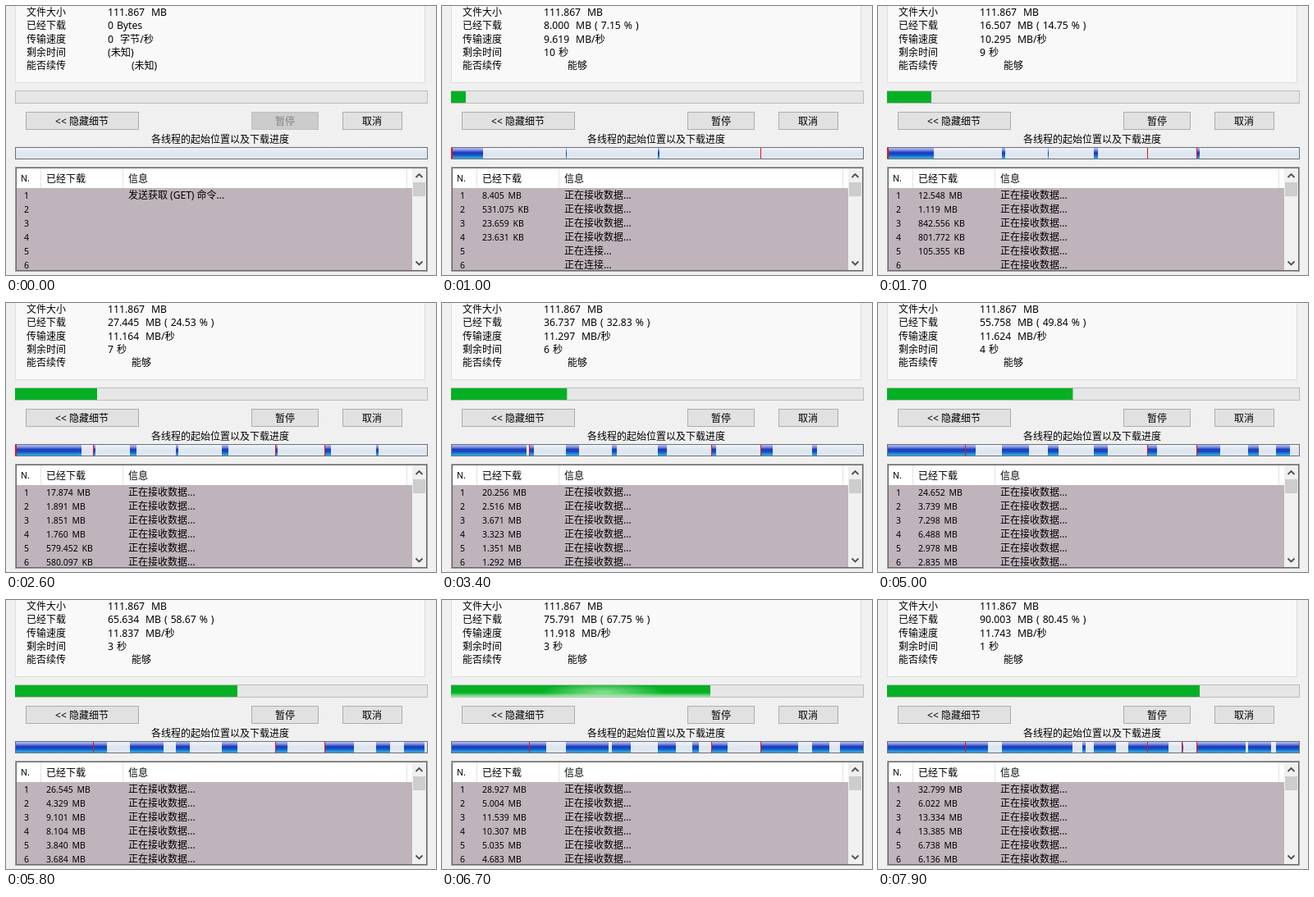
Animation, 524 px wide and 328 px high, one loop 8000 ms. Source, as an HTML page:

```html
<!DOCTYPE html>
<html lang="zh">
<head>
<meta charset="utf-8">
<style>
html, body { margin: 0; width: 100%; height: 100%; overflow: hidden; background: #f0f0f0; }
svg { display: block; }
text { font: 12px "Noto Sans", "Noto Sans CJK SC", "Noto Sans CJK", sans-serif; white-space: pre; }
.value { font-size: 12.2px; word-spacing: .8px; }
.cell { font-size: 10.5px; word-spacing: 2px; }
.mid { text-anchor: middle; }
</style>
</head>
<body>
<svg id="stage" width="524" height="328">
  <defs>
    <linearGradient id="track" x2="0" y2="1">
      <stop stop-color="#f1f4fa"/><stop offset=".5" stop-color="#dde5ef"/><stop offset="1" stop-color="#e0e8f2"/>
    </linearGradient>
    <linearGradient id="blue" x2="0" y2="1">
      <stop stop-color="#b4bdf0"/><stop offset=".22" stop-color="#7d8ee0"/><stop offset=".4" stop-color="#2440bd"/>
      <stop offset=".6" stop-color="#1446c0"/><stop offset="1" stop-color="#2cb4ea"/>
    </linearGradient>
    <radialGradient id="shine">
      <stop stop-color="#d8ffd8" stop-opacity=".6"/><stop offset="1" stop-color="#d8ffd8" stop-opacity="0"/>
    </radialGradient>
    <linearGradient id="rim" x2="0" y2="1">
      <stop stop-color="#d8ffd8" stop-opacity="0"/><stop offset="1" stop-color="#d8ffd8" stop-opacity=".75"/>
    </linearGradient>
  </defs>
</svg>
<script>
const TOTAL = 111.867, KB = 1 / 1024, PX_PER_MB = 502 / TOTAL;
const TIMES = [1000, 2600, 4400, 5800, 6700, 7900];
const stage = document.getElementById('stage');

function add(tag, attrs, content = '', parent = stage) {
  const el = document.createElementNS('http://www.w3.org/2000/svg', tag);
  for (const k in attrs) el.setAttribute(k, attrs[k]);
  el.textContent = content;
  return parent.appendChild(el);
}
const rect = (x, y, width, height, fill, parent) => add('rect', { x, y, width, height, fill }, '', parent);
const box = (x, y, w, h, fill, stroke) =>
  add('rect', { x: x + .5, y: y + .5, width: w - 1, height: h - 1, fill, stroke });
const label = (x, y, content, cls = '', fill = '#000') => add('text', { x, y, class: cls, fill }, content);

// Piecewise-linear value: zero until start, then through the last TIMES.
function ramp(start, values) {
  const times = [start, ...TIMES.slice(-values.length)];
  const points = [0, ...values];
  return t => {
    if (t <= start) return 0;
    const i = times.findIndex(k => t <= k);
    if (i < 0) return points[points.length - 1];
    const u = (t - times[i - 1]) / (times[i] - times[i - 1]);
    return points[i - 1] + (points[i] - points[i - 1]) * u;
  };
}

// Summary panel
box(11, -5, 500, 99, '#f9f9f9', '#dcdcdc');
const lines = [12, 28, 45, 61, 77];
['文件大小', '已经下载', '传输速度', '剩余时间', '能否续传'].forEach((s, i) => label(25, lines[i], s));
label(124, lines[0], '111.867  MB', 'value');
const [doneText, speedText, leftText] = lines.slice(1, 4).map(y => label(124, y, '', 'value'));
const resumeText = label(153, lines[4], '');

// Overall progress
box(11, 103, 503, 16, '#e6e6e6', '#bcbcbc');
const bar = add('svg', { x: 11, y: 104, width: 0, height: 14 });
rect(0, 0, 502, 14, '#06b025', bar);
const rim = rect(0, 9, 502, 5, 'url(#rim)', bar);
const shine = rect(0, -3, 150, 22, 'url(#shine)', bar);

// Buttons
box(24, 129, 138, 22, '#e1e1e1', '#adadad');
label(92.5, 145, '<< 隐藏细节', 'mid');
const pauseBox = box(299, 129, 82, 22, '#ccc', '#bfbfbf');
const pauseText = label(340, 145, '暂停', 'mid');
box(410, 129, 73, 22, '#e1e1e1', '#adadad');
label(446, 145, '取消', 'mid');

// Segment map
label(261, 167, '各线程的起始位置以及下载进度', 'mid');
box(11, 172, 503, 15, 'url(#track)', '#6c7078');

// Thread list
box(11, 196, 503, 128, '#bfb4bc', '#a0a0a0');
rect(12, 197, 483, 25, '#fff');
[42, 142, 488].forEach(x => rect(x, 197, 1, 25, '#e2e2e2'));
label(18, 214, 'N.', 'cell');
label(49, 215, '已经下载');
label(149, 215, '信息');
rect(495, 197, 18, 126, '#f0f0f0');
rect(496, 215, 15, 17, '#cdcdcd');
box(12, 197, 501, 126, 'none', '#696969');
['M499.5 209l4-4 4 4', 'M499.5 311.5l4 4 4-4'].forEach(d =>
  add('path', { d, fill: 'none', stroke: '#505050', 'stroke-width': 1.8 }));

// Each thread fills its spans [x, width] one after another.
const rows = [
  [300, 200, [8.405, 17.874, 23.233, 26.545, 28.927, 32.799], [[12, 94], [485, 28], [305, 23], [370, 18]]],
  [850, 500, [531.075 * KB, 1.891, 3.297, 4.329, 5.004, 6.022], [[263, 42]]],
  [950, 700, [23.659 * KB, 1.851, 5.945, 9.101, 11.539, 13.334], [[151, 56], [249, 14]]],
  [950, 700, [23.631 * KB, 1.76, 5.276, 8.104, 10.307, 13.385], [[388, 63]]],
  [1500, 900, [579.452 * KB, 2.332, 3.84, 5.035, 6.738], [[207, 42]]],
  [1700, 900, [580.097 * KB, 2.199, 3.684, 4.683, 6.136], [[451, 34]]]
].map(([start, connect, values, spans], i) => {
  const y = 235 + i * 17;
  label(22, y, i + 1, 'cell');
  return { start, connect, spans, size: ramp(start, values), sizeText: label(49, y, '', 'cell'), info: label(149, y, '') };
});

const segments = [];
function segment(x, length) {
  segments.push({ length, el: rect(x, 173, 0, 13, 'url(#blue)') });
}
rows.forEach(row => {
  let before = 0;
  row.spans.forEach(([x, width]) => {
    const offset = before;
    segment(x, t => Math.min(width, row.size(t) * PX_PER_MB - offset));
    before += width;
  });
});
// Two threads below the visible part of the list
segment(106, ramp(2000, [3, 10, 17, 21, 28]));
segment(328, ramp(1700, [3, 10, 15, 20, 26]));

// Red marks: [x, width, from, until]
const marks = [[11, 2, 300, 3000], [106, 1, 2000, 8000], [328, 1, 1700, 8000], [370, 1, 7700, 8000], [388, 1, 950, 8000]]
  .map(([x, width, from, until]) => ({ from, until, el: rect(x, 173, width, 13, '#f01010') }));

const done = ramp(300, [8, 27.445, 48.351, 65.634, 75.791, 90.003]);
const speed = ramp(300, [9.619, 11.164, 11.464, 11.837, 11.918, 11.743]);
const barWidth = ramp(700, [18, 100, 193, 271, 316, 381]);
const formatSize = mb => mb < 1 ? (mb / KB).toFixed(3) + ' KB' : mb.toFixed(3) + ' MB';
const percent = mb => (Math.floor(mb / TOTAL * 1e4) / 100).toFixed(2);
const show = (el, on) => el.setAttribute('visibility', on ? 'visible' : 'hidden');

function draw(t) {
  const got = done(t), rate = speed(t), active = t > 300;
  doneText.textContent = active ? `${got.toFixed(3)}  MB ( ${percent(got)} % )` : '0 Bytes';
  speedText.textContent = active ? `${rate.toFixed(3)}  MB/秒` : '0  字节/秒';
  leftText.textContent = active ? Math.floor((TOTAL - got) / Math.max(rate, 9)) + ' 秒' : '(未知)';
  resumeText.textContent = active ? '能够' : '(未知)';
  pauseBox.setAttribute('fill', active ? '#e1e1e1' : '#ccc');
  pauseBox.setAttribute('stroke', active ? '#adadad' : '#bfbfbf');
  pauseText.setAttribute('fill', active ? '#000' : '#838383');

  const width = barWidth(t);
  const peak = ((t - 4265 + 3 * 2100) % 2100) * .9 - 116;
  bar.setAttribute('width', width);
  shine.setAttribute('x', peak - 75);
  show(rim, peak > 0 && peak < width);

  rows.forEach((r, i) => {
    const size = r.size(t);
    r.sizeText.textContent = size ? formatSize(size) : '';
    r.info.textContent = t >= r.start ? '正在接收数据...'
      : i === 0 ? '发送获取 (GET) 命令...'
      : t >= r.connect ? '正在连接...' : '';
  });
  segments.forEach(s => {
    const length = s.length(t);
    s.el.setAttribute('width', length > 0 ? Math.max(1, Math.round(length)) : 0);
  });
  marks.forEach(m => show(m.el, t >= m.from && t < m.until));
}

function frame(now) {
  draw(Math.floor(now % 8000 / 100) * 100);
  requestAnimationFrame(frame);
}
draw(0);
requestAnimationFrame(frame);
</script>
</body>
</html>
```
